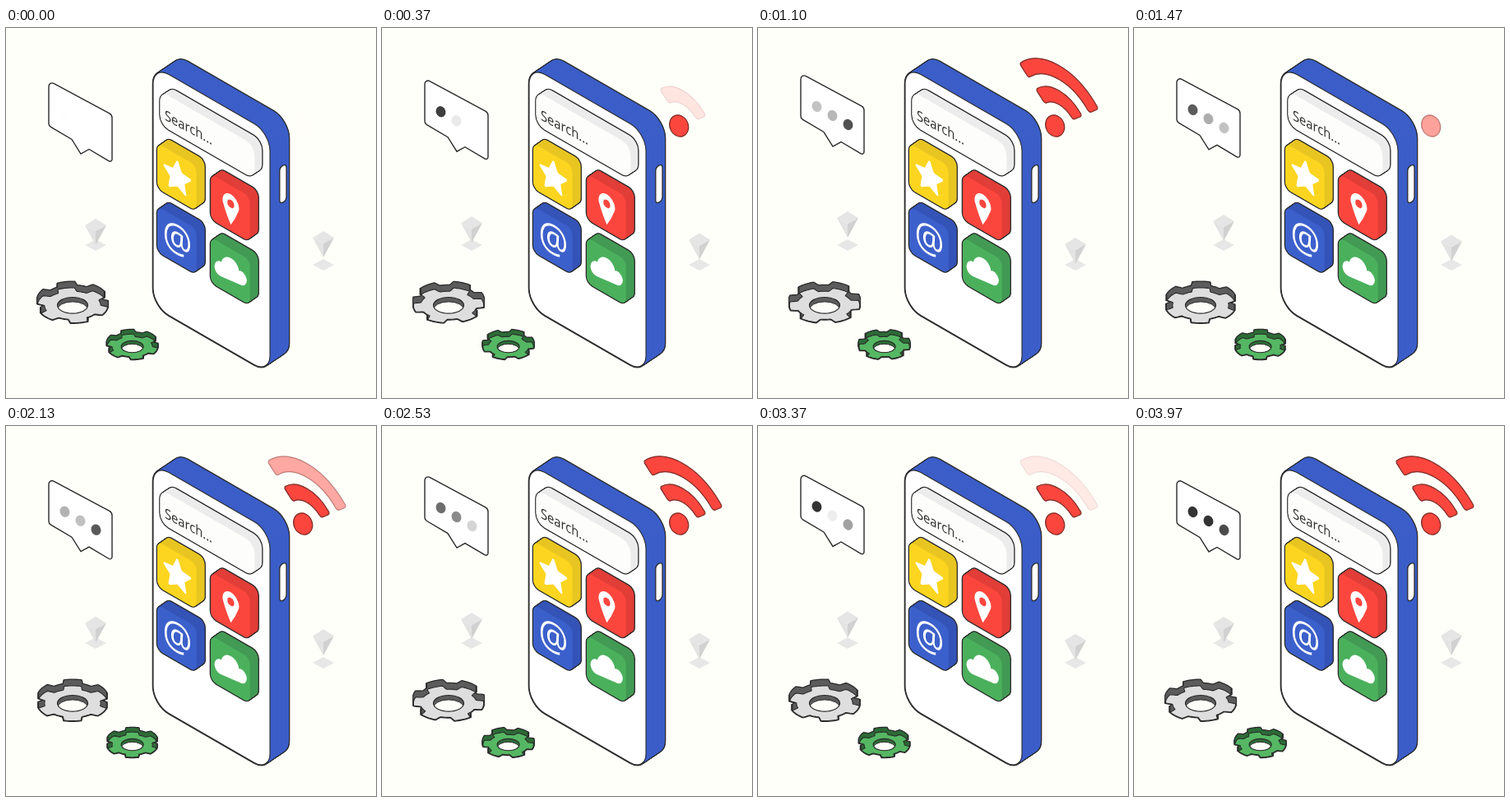
Recreate the animation shown at these times as an HTML page with a canvas. Size 450x450 px, loop 4010 ms.

```html
<!DOCTYPE html>
<html lang="en">
<head>
<meta charset="utf-8">
<title>Phone apps</title>
<style>
  html, body { margin: 0; width: 100%; height: 100%; overflow: hidden; background: #fffffa; }
  canvas { display: block; width: 450px; height: 450px; }
</style>
</head>
<body>
<canvas id="stage"></canvas>
<script>
const LOOP = 4010, BEAT = LOOP / 12;
const PAPER = '#fffffa', INK = '#2a2a2a', BLUE = '#3c5ec8', RED = '#fb463e';
const canvas = document.getElementById('stage');
const ctx = canvas.getContext('2d');
const dpr = window.devicePixelRatio || 1;
canvas.width = canvas.height = 450 * dpr;

const clamp = v => Math.max(0, Math.min(1, v));
const rad = deg => deg * Math.PI / 180;

// Places a flat path on an isometric wall; dir 1 falls to the right, -1 rises.
function wall(path, x, y, dir = 1) {
  const out = new Path2D();
  out.addPath(path, new DOMMatrix([.866, .5 * dir, 0, 1, x, y]));
  return out;
}

function flat(build) {
  const p = new Path2D();
  build(p);
  return p;
}

const roundBox = (w, h, r) => flat(p => p.roundRect(0, 0, w, h, r));
const blob = (x, y, rx, ry) => flat(p => p.ellipse(x, y, rx, ry, -.4, 0, 7));

function polygon(points) {
  return flat(p => {
    points.forEach(([x, y]) => p.lineTo(x, y));
    p.closePath();
  });
}

function paint(path, fill, line, width = 1.3) {
  if (fill) { ctx.fillStyle = fill; ctx.fill(path); }
  if (line) { ctx.strokeStyle = line; ctx.lineWidth = width; ctx.stroke(path); }
}

function shifted(dx, dy, draw) {
  ctx.save();
  ctx.translate(dx, dy);
  draw();
  ctx.restore();
}

function extrude(path, dx, dy, side, face, edge) {
  const n = Math.ceil(Math.hypot(dx, dy) * 1.5);
  const sweep = draw => {
    for (let i = n; i >= 0; i--) shifted(dx * i / n, dy * i / n, draw);
  };
  sweep(() => paint(path, null, INK, 2.6));
  sweep(() => paint(path, side));
  paint(path, face, edge, 1.1);
}

const phone = wall(roundBox(164, 293, 22), 179, 45.5);
const button = wall(roundBox(9.5, 45, 4.7), 332.8, 169.5, -1);
const search = wall(roundBox(132.5, 41, 12), 187.5, 76.5);
const tile = roundBox(55, 55, 8);

const star = polygon([...Array(10)].map((_, i) => {
  const r = i % 2 ? 9 : 18.8, a = rad(i * 36 - 90);
  return [r * Math.cos(a), r * Math.sin(a)];
}));

const marker = flat(p => {
  p.arc(0, -5.5, 11.5, rad(155), rad(25));
  p.quadraticCurveTo(7, 9, 0, 20);
  p.quadraticCurveTo(-7, 9, -10.4, -.6);
  p.closePath();
});
const markerHole = flat(p => p.arc(0, -5.5, 4.8, 0, 7));

const cloud = flat(p => {
  for (const [x, y, r] of [[-14, 2, 9], [-1, -4, 12.5], [14, 2.5, 8.5]]) {
    p.moveTo(x + r, y);
    p.arc(x, y, r, 0, 7);
  }
  p.rect(-14, 0, 28, 11);
});

const bubble = flat(p => {
  p.moveTo(52, 90);
  p.arcTo(52, 64, 80, 80, 4);
  p.arcTo(129, 105.5, 129, 130, 6);
  p.arcTo(129, 164, 101, 148, 2.5);
  p.lineTo(101, 147.5);
  p.lineTo(91, 153);
  p.lineTo(80, 135.5);
  p.arcTo(52, 119, 52, 90, 5);
  p.closePath();
});

// An arc-shaped bar with softly rounded ends.
const band = r => wall(flat(p => {
  const a = rad(49), up = -Math.PI / 2, soft = 3.5;
  const outer = r + 8.5, inner = r - 8.5;
  const at = (ang, len) => [len * Math.cos(up + ang), len * Math.sin(up + ang)];
  p.arc(0, 0, outer, up - a + soft / outer, up + a - soft / outer);
  p.quadraticCurveTo(...at(a, outer), ...at(a, outer - soft));
  p.lineTo(...at(a, inner + soft));
  p.quadraticCurveTo(...at(a, inner), ...at(a - soft / inner, inner));
  p.arc(0, 0, inner, up + a - soft / inner, up - a + soft / inner, true);
  p.quadraticCurveTo(...at(-a, inner), ...at(-a, inner + soft));
  p.lineTo(...at(-a, outer - soft));
  p.quadraticCurveTo(...at(-a, outer), ...at(-a + soft / outer, outer));
  p.closePath();
}), 366, 119);
const signal = [blob(361.2, 119, 11.2, 13.4), band(34.5), band(65)];

function icon(col, row, face, side, draw) {
  const x = 184 + 65 * col, y = 140 + 37.5 * col + 77 * row;
  extrude(wall(tile, x, y), 10, -7, side, face);
  ctx.save();
  ctx.transform(.866, .5, 0, 1, x + 24.4, y + 41.8);
  ctx.fillStyle = '#fff';
  draw();
  ctx.restore();
}

function drawText(t) {
  ctx.save();
  ctx.transform(.866, .46, 0, 1, 193, 111.5);
  ctx.font = '17px "Open Sans", "Noto Sans", sans-serif';
  ctx.fillStyle = INK;
  ctx.fillText('Search', 0, 0);
  const hop = clamp((t % (3 * BEAT) - 560) / 400);
  ctx.fillText('...', ctx.measureText('Search').width, 4 * Math.sin(Math.PI * hop));
  ctx.restore();
}

function drawPhone(t) {
  extrude(phone, 23, -15.5, BLUE, '#fff', INK);
  paint(button, '#fff', INK, 1.3);
  extrude(search, 9, -6, '#ececec', '#fdfdfb');
  drawText(t);
  icon(0, 0, '#fbd51f', '#e8c522', () => {
    ctx.lineJoin = 'round';
    paint(star, '#fff', '#fff', 3);
  });
  icon(1, 0, RED, '#e23e38', () => {
    paint(marker, '#fff');
    paint(markerHole, RED);
  });
  icon(0, 1, '#3c60cb', '#3554b8', () => {
    ctx.font = '46px "Open Sans", "Noto Sans", sans-serif';
    ctx.textAlign = 'center';
    ctx.fillText('@', 0, 13);
  });
  icon(1, 1, '#4bb05c', '#439a54', () => {
    ctx.transform(1, -.12, 0, 1, 0, 0);
    paint(cloud, '#fff');
  });
}

function drawGear(cx, cy, size, depth, hole, face, side, turn) {
  const points = [];
  for (let a = 0; a < 360; a += 2) {
    const off = Math.abs((a + 30) % 60 - 30);
    const r = size * (1 - .2 * clamp((off - 14) / 5));
    const ang = rad(a + turn);
    points.push([cx + r * Math.cos(ang), cy + r * Math.sin(ang) * .5]);
  }
  extrude(polygon(points), 0, -depth, side, face, INK);
  const ring = flat(p => p.ellipse(cx, cy, hole, hole * .53, 0, 0, 7));
  ctx.save();
  ctx.clip(ring);
  paint(ring, side);
  shifted(0, depth * .75, () => paint(ring, PAPER, INK, 1));
  ctx.restore();
  paint(ring, null, INK, 1.2);
}

function drawPointer(x, top, ground) {
  shifted(x, ground, () => paint(polygon([[-13, 0], [0, -7], [13, 0], [0, 7]]), '#e7e7e7'));
  shifted(x, top, () => {
    paint(polygon([[-13, 8], [0, 15], [0, 32]]), '#e3e3e3');
    paint(polygon([[13, 8], [0, 15], [0, 32]]), '#d1d1d1');
    paint(polygon([[-13, 8], [0, 0], [13, 8], [0, 15]]), '#e5e5e5');
  });
}

// Rises for one beat, fades for two; the last pulse stays lit.
function dotAlpha(t, i) {
  const rel = t - i * BEAT;
  if (rel < 0) return 0;
  const p = rel % (3 * BEAT) / BEAT;
  if (p < 1) return p;
  return rel >= 9 * BEAT ? 1 : (3 - p) / 2;
}

function drawBubble(t, lift) {
  shifted(0, -lift, () => {
    paint(bubble, '#fff', INK, 1.4);
    for (let i = 0; i < 3; i++) {
      ctx.globalAlpha = dotAlpha(t, i);
      paint(blob(71.5 + 19 * i, 104.5 + 11 * i, 5.8, 6.8), '#333');
    }
  });
}

function drawSignal(t) {
  const p = t % (4 * BEAT);
  signal.forEach((part, i) => {
    ctx.globalAlpha = clamp((p - i * BEAT) / (.8 * BEAT));
    paint(part, RED, '#7a2a24', 1.2);
  });
  ctx.globalAlpha = 1;
}

function draw(t) {
  ctx.setTransform(dpr, 0, 0, dpr, 0, 0);
  ctx.fillStyle = PAPER;
  ctx.fillRect(0, 0, 450, 450);
  const lift = 4.6 * (1 - Math.cos(t / LOOP * 4 * Math.PI));
  const turn = 19 + 360 * t / LOOP;
  drawPointer(109, 232 - lift, 264);
  drawPointer(386, 247 + lift * .9, 288);
  drawBubble(t, lift);
  drawSignal(t);
  drawPhone(t);
  drawGear(81, 337.3, 42.7, 7.2, 18.5, '#dedede', '#5c5c5c', turn);
  drawGear(153.6, 387.6, 30.7, 5.2, 13.5, '#55b763', '#2d6b37', turn);
}

const start = performance.now();
function tick() {
  draw((performance.now() - start) % LOOP);
  requestAnimationFrame(tick);
}
tick();
</script>
</body>
</html>
```
